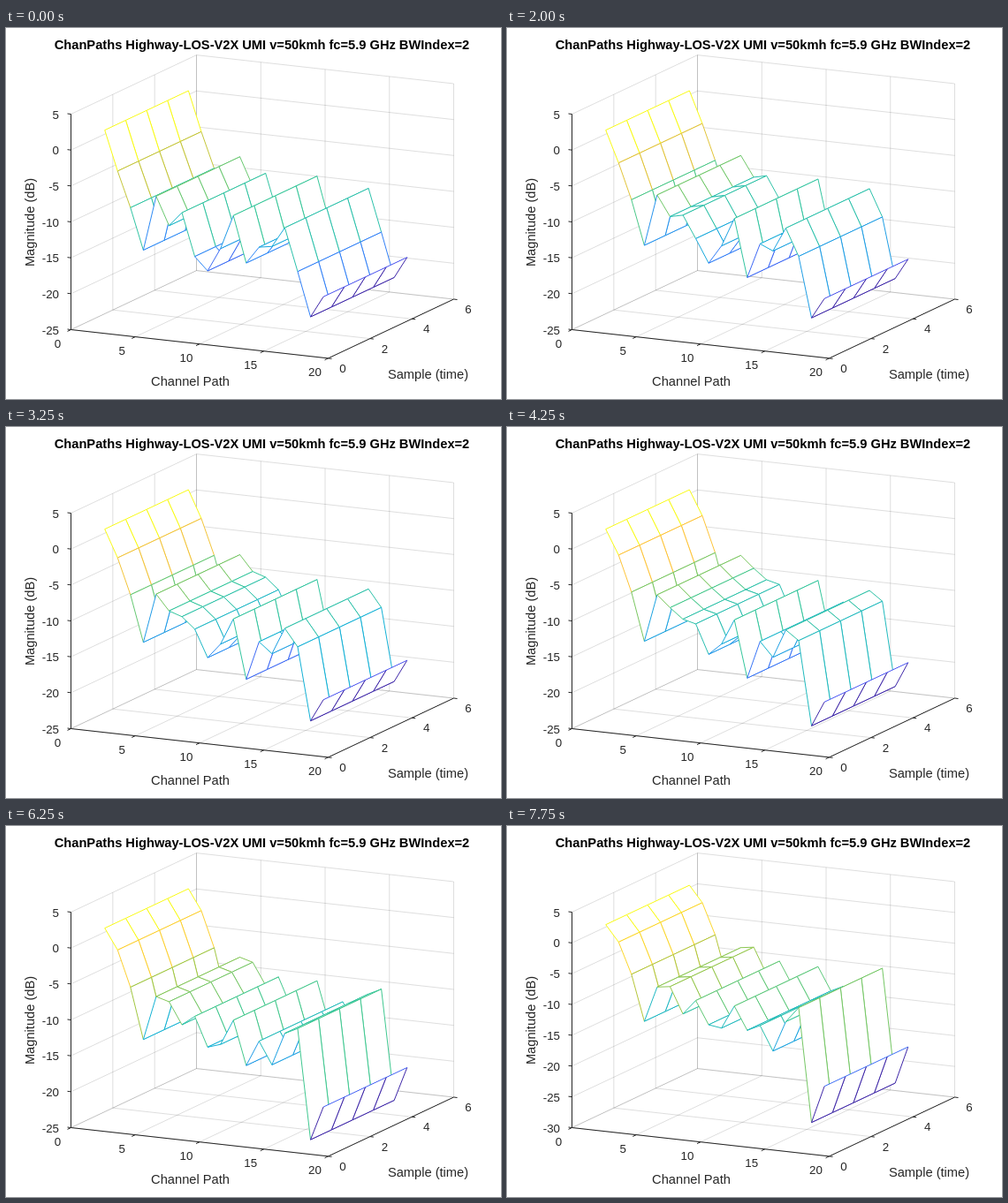
Animation, 560 px wide and 420 px high, one loop 8000 ms. Source, as an HTML page with a canvas:

```html
<!DOCTYPE html>
<html lang="en">
<head>
<meta charset="utf-8">
<title>Channel paths</title>
<style>
  html, body { margin: 0; width: 100%; height: 100%; overflow: hidden; background: #fff; }
  canvas { display: block; }
</style>
</head>
<body>
<canvas id="stage" width="560" height="420"></canvas>
<script>
const ctx = document.getElementById('stage').getContext('2d');
const LOOP = 8000, STEP = 250, RESCALE = 6500;
const SAMPLES = 5, Z_MAX = 5, HEIGHT = 244;
const FONT = '"Liberation Sans", Arial, sans-serif';
const GRID = 'rgba(38, 38, 38, 0.15)', DARK = '#262626';

// Each path drifts from one dB level to another along an arc; the third value is its bend.
const PATHS = [
  [1.6, 1.6, 0], [-3.9, -1], [-8.8, -6], [-14.5, -13.4], [-6.8, -7.6], [-10.7, -7.3],
  [-8.7, -11.5], [-14.6, -9.1, 1.4], [-16.4, -12.8, 0.2], [-13.1, -13.1], [-8.3, -9.3, -0.2], [-14.7, -13, -3.2],
  [-12.3, -12], [-12, -15.9], [-9.2, -10.9], [-15.1, -8.4], [-21.2, -26.8, 1.7], [-18.2, -20.7]
];

const PARULA = [0x3e26a8, 0x4852f4, 0x2e87f7, 0x12b1d6, 0x37c897, 0xabc739, 0xfec338, 0xf9fb15];

function levelAt([from, to, bend = 0.5], u) {
  return from + (to - from) * u + bend * 4 * u * (1 - u);
}

function colour(u) {
  const x = u * (PARULA.length - 1), i = Math.min(PARULA.length - 2, Math.floor(x));
  const channel = shift => {
    const a = PARULA[i] >> shift & 255, b = PARULA[i + 1] >> shift & 255;
    return Math.round(a + (b - a) * (x - i));
  };
  return `rgb(${[16, 8, 0].map(channel)})`;
}

function line(a, b, style) {
  ctx.strokeStyle = style;
  ctx.beginPath();
  ctx.moveTo(...a);
  ctx.lineTo(...b);
  ctx.stroke();
}

function text(str, x, y, align, size = 13.33, weight = '', fill = DARK) {
  ctx.font = `${weight} ${size}px ${FONT}`;
  ctx.textAlign = align;
  ctx.fillStyle = fill;
  ctx.fillText(str, x, y);
}

function tick([x, y], dx, dy, label, labelX, labelY, align = 'center') {
  line([x, y], [x + dx, y + dy], DARK);
  text(label, x + labelX, y + labelY, align);
}

function drawAxes(project, zMin) {
  const origin = project(0, 0, zMin), corner = project(20, 0, zMin);
  for (let p = 0; p <= 20; p += 5) {
    const front = project(p, 0, zMin), back = project(p, 6, zMin);
    line(front, back, GRID);
    line(back, project(p, 6, Z_MAX), GRID);
    tick(front, -4, 1.9, p, -15, 20);
  }
  for (let s = 0; s <= 6; s += 2) {
    const left = project(0, s, zMin), right = project(20, s, zMin);
    line(left, right, GRID);
    line(left, project(0, s, Z_MAX), GRID);
    tick(right, 4, 0.5, s, 16.5, 16);
  }
  for (let z = zMin; z <= Z_MAX; z += 5) {
    const left = project(0, 0, z), back = project(0, 6, z);
    line(left, back, GRID);
    line(back, project(20, 6, z), GRID);
    tick(left, -4, -0.5, z, -13.5, 5, 'right');
  }
  line(origin, project(0, 0, Z_MAX), DARK);
  line(origin, corner, DARK);
  line(corner, project(20, 6, zMin), DARK);
}

function drawLabels() {
  text('ChanPaths Highway-LOS-V2X UMI v=50kmh fc=5.9 GHz BWIndex=2', 289.5, 24, 'center', 14.67, 'bold', '#000');
  text('Channel Path', 208.5, 405, 'center', 14.67);
  text('Sample (time)', 477.5, 397, 'center', 14.67);
  ctx.save();
  ctx.translate(32, 220);
  ctx.rotate(-Math.PI / 2);
  text('Magnitude (dB)', 0, 0, 'center', 14.67);
  ctx.restore();
}

// White faces painted back to front hide the lines behind them.
function drawMesh(project, levels) {
  const low = Math.min(...levels), high = Math.max(...levels);
  const colours = levels.map(z => colour((z - low) / (high - low)));
  const vertex = (p, s) => project(p + 1, s, levels[p]);
  for (let s = SAMPLES - 1; s >= 1; s--) {
    for (let p = 0; p < levels.length - 1; p++) {
      const a = vertex(p, s), b = vertex(p + 1, s), c = vertex(p + 1, s + 1), d = vertex(p, s + 1);
      ctx.fillStyle = '#fff';
      ctx.beginPath();
      for (const point of [a, b, c, d]) ctx.lineTo(...point);
      ctx.fill();
      line(d, c, colours[p]);
      line(a, d, colours[p]);
      line(b, c, colours[p + 1]);
      line(a, b, colours[p]);
    }
  }
}

function draw(now) {
  const ms = Math.floor((now % LOOP) / STEP) * STEP;
  const u = ms / (LOOP - STEP);
  const zMin = ms < RESCALE ? -25 : -30;
  const project = (p, s, z) => [
    73.5 + 14.55 * p + 23.67 * s,
    341.5 + 1.62 * p - 11.15 * s - HEIGHT * (z - zMin) / (Z_MAX - zMin)
  ];
  ctx.fillStyle = '#fff';
  ctx.fillRect(0, 0, 560, 420);
  drawAxes(project, zMin);
  drawMesh(project, PATHS.map(path => levelAt(path, u)));
  drawLabels();
}

const start = performance.now();
function frame() {
  draw(performance.now() - start);
  requestAnimationFrame(frame);
}
frame();
</script>
</body>
</html>
```
